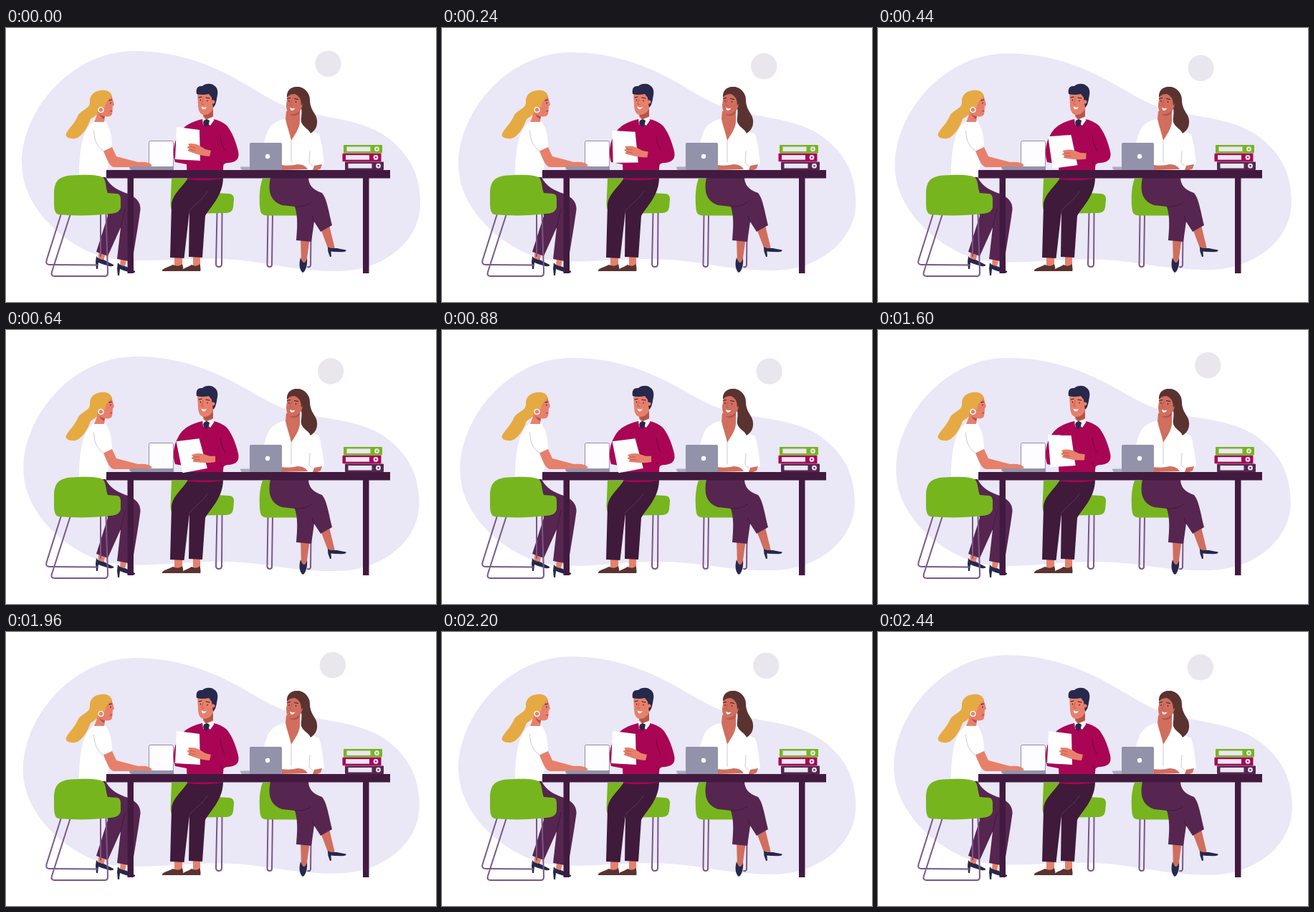
Animation, 600 px wide and 382 px high, one loop 2480 ms. Source, as an HTML page:

```html
<!DOCTYPE html>
<html lang="en">
<head>
<meta charset="utf-8">
<title>Team meeting</title>
<style>
html, body { margin: 0; width: 100%; height: 100%; overflow: hidden; background: #fff; }
svg { display: block; width: 100%; height: 100%; }
.line { fill: none; stroke-linecap: round; stroke-linejoin: round; }
.frame { stroke: #7a5689; stroke-width: 2; }
.fold { stroke: #c9c8d6; }
.face { stroke: #3a2030; stroke-width: 1.2; }
.shade { stroke: #bd5b50; stroke-width: .9; }
.green { fill: #77b51e; }
.table { fill: #421a40; }
.plum { fill: #562650; }
.dark { fill: #3f1a3b; }
.wine { fill: #a90554; }
.navy { fill: #26284c; }
.skin { fill: #e7806b; }
.tan { fill: #d16e5d; }
.shadow { fill: #b4554d; }
.brown { fill: #5a3331; }
.blond { fill: #e6aa43; }
.grey { fill: #9293aa; }
.white { fill: #fff; }
</style>
</head>
<body>
<svg viewBox="0 0 600 382">
  <defs>
    <path id="heel" class="navy" d="M0 0C4 6 11 4 14 7L24 12Q25 15 18 14L8 11L3 9L2 18H0L-1 8Z"/>
    <path id="shoe" class="brown" d="M0 10C-1 6 8 5 15 1Q23 5 28 0Q30 5 29 10Z"/>
    <g id="features">
      <path class="line face" d="M0 0L4 -1M10 0L15 1M2.500 3V4M12 4V5"/>
      <path class="line shade" d="M6 2L4 9L7 10"/>
      <path class="white" d="M3.500 12.500Q7 14.500 11 13Q9 16.500 6 16.500Q4 15.500 3.500 12.500Z"/>
    </g>
  </defs>

  <path id="blob" fill="#eae7f6" d="M180 32C255 32 312 65 345 85S392 112 430 120S506 132 535 155S578 205 578 245
    C578 296 528 339 462 339S360 324 300 322S200 328 150 322S22 260 22 188S90 32 180 32Z"/>
  <circle id="ball" r="18.2" fill="#e9e7ed"/>

  <g id="backChairs">
    <path class="line frame" d="M294.500 258L293 329Q293 333 297 333Q301 333 301 329L301.500 257"/>
    <path class="green" d="M231 210H256L262 228L311 231Q318 231 318 239L317 250Q316 258 306 258L238 259Q230 258 229.500 246Z"/>
    <path class="line frame" d="M365.500 260L364.500 330Q365 333 368 333Q371 333 371 330L372 260M425.500 290L425 331Q424 334 421 333"/>
    <path class="green" d="M358 210C353 222 353 245 355 255Q356 261 364 261.500H407V238L375 210Z"/>
  </g>

  <g id="leftWoman">
    <path class="skin" d="M130 308L139 312L136 326L128 324ZM160 319H169L166 333L159 332Z"/>
    <path class="plum" d="M131 208H139C145 221 158 227 170 231C182 236 188 243 187.500 253C185 272 180 302 176 326L155 322L160 278L142 318L126 312L142 262Z"/>
    <path class="line" stroke="#3f1a3b" d="M166 252L160 278"/>
    <use href="#heel" x="126" y="318"/>
    <use href="#heel" x="156" y="327"/>
    <path class="white" d="M123 130C108 140 102 165 102 208H138L143 192L140 172L148 166C148 152 146 141 139 130Z"/>
    <path class="skin" d="M136 171.500L148 166L154 179L186 187.500Q201 187 204 192L200 194H152C146 194 143 189 136 171.500Z"/>
    <path class="line fold" d="M122.500 143C123 157 127 165 136 171.500"/>
    <path class="blond" d="M117 104C117 113 104 114 100 123C96 133 88 139 84 147C82 152 88 155 97 154C107 151 114 138 118 127L128 120L142 106L148 95C146 88 140 86 132 87C122 88 116 95 117 104Z"/>
    <path class="skin" d="M139 98L147.500 95L149 100L151 107L149 109L148 120C146 124 142 124 138 123L137 131H123C126 125 127 120 128 116C130 108 137 108 137 112Z"/>
    <path class="shadow" d="M130 119Q133 123 138 123L137 127Q132 125 130 119Z"/>
    <path class="blond" d="M128 116C126 106 132 98 148 95.500C141 100 139 104 138 111Q130 106 128 116Z"/>
    <path class="line face" d="M144 101L147.500 100M146 104V105"/>
    <path class="line" stroke="#a8263f" d="M145.500 116L148 115.500"/>
    <circle class="line" cx="132.500" cy="114" r="3.500" stroke="#fff" stroke-width="1.500"/>
  </g>

  <g id="leftChair">
    <path class="line frame" d="M77 259L56.500 324Q55 330 61 330L128 330.500M90 259L64 340Q62 346 68 346H138Q142 346 142 341L139.500 259M132 260V318"/>
    <path class="green" d="M67 232C67 214 73 207 91 205.500C110 204 130 204 136 209C140 214 139 223 142 230L155 231Q160 232 160 238V250Q159 258 145 259C120 262 95 262 73 260Q67 258 67 246Z"/>
  </g>

  <g id="man">
    <path class="skin" d="M235 316H246V332H235ZM261 314H271V332H261Z"/>
    <use href="#shoe" x="218" y="329"/>
    <use href="#shoe" transform="translate(246 329) scale(.87 1)"/>
    <path class="dark" d="M255 208C246 222 232 232 231 246L229 320L248.500 321L256 255L255 319L274 320L278 262C284 250 303 235 303 208Z"/>
    <path class="line" stroke="#6b4268" stroke-width=".7" d="M281 228C274 241 262 246 256 255"/>
    <path class="wine" d="M274 127C258 131 246 137 240 150C234 160 232 175 236 187L252 190L253 211Q278 214 303 210V193Q303 188 311 188C322 187 326 182 324 172C320 155 314 143 308 136Q300 129 289 127Z"/>
    <path class="white" d="M274 125L279 119L289 122L290 129L285 136L279 131L275 135Z"/>
    <path class="skin" d="M275 112H289V124L279 128L275 124Z"/>
    <path class="shadow" d="M275 121Q283 122 289 113V123L279 127Z"/>
    <path class="navy" d="M276 129L280 127L284 129L283 134L279 138L275 133Z"/>
    <path class="skin" d="M267 90L268 107C268 115 271 121 276 121C283 121 288 116 290 108L291 93L283 87Z"/>
    <path class="navy" d="M266 92C265 86 266 80 274 81C278 77 287 77 290 80C296 83 296 90 294.500 96Q293 108 289 111L287 97L283 92Q274 94 266 92Z"/>
    <circle class="skin" cx="289" cy="103" r="2.500"/>
    <use href="#features" x="269" y="97"/>
    <path class="line" stroke="#75043f" d="M299 150Q300 161 305 170M303 193Q299 189 299 184"/>
  </g>

  <g id="rightWoman">
    <path class="tan" d="M411 292H424L419 328H412ZM439 280L451 275L459 308L450 309Z"/>
    <path class="navy" d="M411 320C408 330 410 338 414 341C418 340 421 330 420 321Q416 334 411 320Z"/>
    <use href="#heel" transform="translate(449 305) rotate(-12) scale(1 .8)"/>
    <path class="plum" d="M369 208C366 224 366 240 385 247L403 249C408 265 406 280 405 296L426 298L430 270L439 284L455 275C450 256 448 238 441 230Q422 224 422 208Z"/>
    <path class="line" stroke="#3f1a3b" d="M403 249Q418 250 426 243M430 270L427 262"/>
    <path class="white" d="M392 126C377 129 368 135 364 147L358 166V198H428L444 190C443 175 440 158 437 148L425 143L410 128Z"/>
    <path class="tan" d="M391 116L410 112V130C410 140 402 150 398 157C396 147 392 137 390 127Z"/>
    <path class="brown" d="M393 98C391 88 398 82 406 82C416 82 424 90 424 100C424 112 430 117 433 124C436 134 433 142 425 147C422 140 415 139 412 131C411 125 415 115 410 108Z"/>
    <path class="tan" d="M393 94L391 107C391 115 394 121 399 121C406 121 411 117 413 110C415 105 412 100 412 96L404 90Z"/>
    <path class="shadow" d="M395 120Q404 122 410 115V118Q403 126 395 120Z"/>
    <path class="brown" d="M392 97C391 87 398 82 406 82C415 82 420 88 421 96L412 108Q412 95 403 92Q395 92 392 97Z"/>
    <use href="#features" x="392.500" y="98.500"/>
    <path class="line fold" d="M398 157V187M424 172L423 188L428 193"/>
    <path class="tan" d="M384 191Q396 193 407 190Q417 190 421 197L384 198ZM430 192L441 190L439 196Q434 199 428 198Z"/>
  </g>

  <g id="desk">
    <path class="table" d="M140 198H536V209.500H506.500V342H498V209.500H178V342H169.500V209.500H140Z"/>
    <rect x="199.500" y="157.500" width="34" height="36" rx="2" fill="#fdfdff" stroke="#8e8fa7"/>
    <path class="grey" d="M172 194.500Q174 193 178 193H234V198H176Q173 198 172 194.500Z"/>
    <path class="skin" d="M184 187Q201 186 204 192Q200 194 195 193L180 192Z"/>
    <path fill="#a9aabd" d="M327 193.500H342V198H329Q327 197 327 193.500Z"/>
    <rect class="grey" x="340" y="160" width="45" height="38" rx="2"/>
    <circle class="white" cx="365" cy="179" r="3.200"/>
    <g id="binders"></g>
  </g>

  <g id="reading">
    <path class="white" d="M238 138L270 142L271 185L236 183Z"/>
    <path class="wine" d="M285 169L311 171L312 187H303L284 179Z"/>
    <path class="skin" d="M254 161.500Q263 160 270 164L278 169L286 171L284 179Q272 178 264 175L255 172Q252 170 256 169L253 167Q252 165 256 165Z"/>
    <path class="line shade" d="M256 165L264 167M256 169L264 171"/>
  </g>
</svg>
<script>
const LOOP = 2480, STEP = 40;
const get = id => document.getElementById(id);
const blob = get('blob'), ball = get('ball'), reading = get('reading');

const binder = (kind, x, y) => `<g transform="translate(${x} ${y})">
  <rect class="${kind}" width="54" height="11.500" rx="1"/>
  <rect x="4.500" y="2.500" width="33" height="6.500" fill="#eae7f6"/>
  <circle cx="46.500" cy="5.700" r="3.400" fill="#eae7f6"/>
  <circle class="${kind}" cx="46.500" cy="5.700" r="1.200"/></g>`;
get('binders').innerHTML = binder('green', 471, 163) + binder('wine', 469.5, 174.7) + binder('plum', 473, 186.5);

const ease = (t, from, to) => {
  const p = Math.min(1, Math.max(0, (t - from) / (to - from)));
  return (1 - Math.cos(Math.PI * p)) / 2;
};

function draw(t) {
  const turn = t / LOOP;

  // The backdrop tilts and shrinks a little, then returns.
  const k = 1 - Math.abs(1 - 2 * turn);
  blob.setAttribute('transform', `translate(330 339) scale(${1 - .0176 * k} ${1 - .011 * k})
    translate(-330 -339) rotate(${-2.5 * k} 330 210)`);

  const a = (202 - 360 * turn) * Math.PI / 180;
  ball.setAttribute('cx', 455.1 + 6 * Math.cos(a));
  ball.setAttribute('cy', 52 + 5.8 * Math.sin(a));

  const dip = ease(t, 0, 640) - ease(t, 1240, 1960);
  reading.setAttribute('transform', `translate(${8 * dip} ${-1.5 * dip}) rotate(${-14 * dip} 310 182)`);
}

function tick() {
  draw(Math.floor(performance.now() % LOOP / STEP) * STEP);
  requestAnimationFrame(tick);
}
tick();
</script>
</body>
</html>
```
